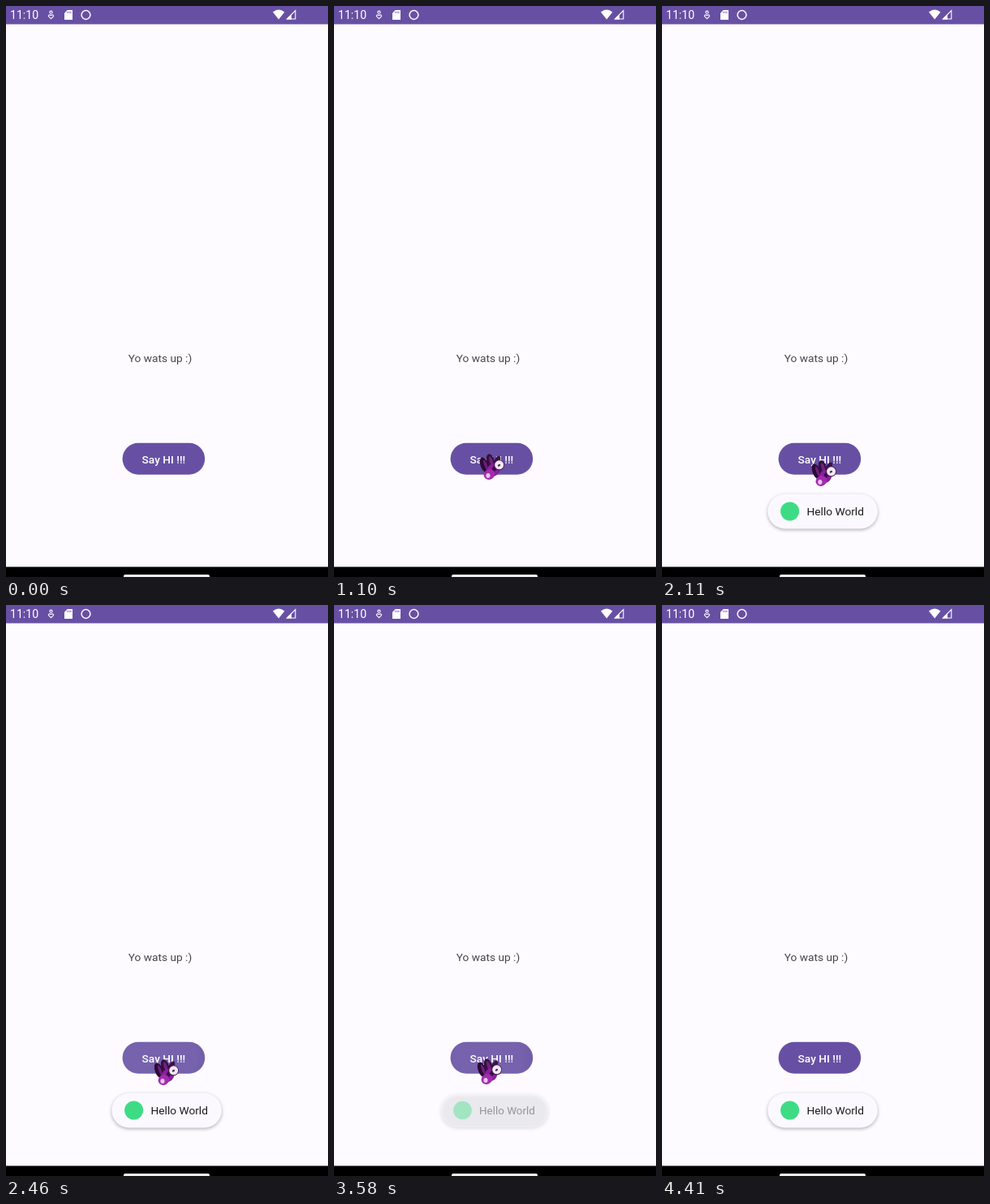
An HTML page with a canvas that plays this animation: 397x704 px, repeating every 5.74 s.

```html
<!DOCTYPE html>
<html lang="en">
<head>
<meta charset="utf-8">
<title>Say HI</title>
<style>
  html, body { margin: 0; width: 100%; height: 100%; overflow: hidden; background: #fdfbff; }
  canvas { display: block; width: 397px; height: 704px; }
</style>
</head>
<body>
<canvas id="stage"></canvas>
<script>
const W = 397, H = 704, LOOP = 5740;
const START = 320, END = 4410, STEP = (END - START) / 60;
const PURPLE = '#6750a4', PAPER = '#fdfbff';
const canvas = document.getElementById('stage');
const ctx = canvas.getContext('2d');
const dpr = window.devicePixelRatio || 1;
canvas.width = W * dpr;
canvas.height = H * dpr;

// Pointer stops: time, x, y of its top left corner
const path = [
  [320, 326, 684], [390, 284, 645], [460, 247, 607], [530, 216, 578],
  [600, 195, 561], [740, 179, 552], [1300, 179, 552], [1430, 184, 560],
  [1560, 185, 560], [2040, 185, 560], [2180, 182, 560], [3300, 182, 560],
  [3500, 176, 559], [4000, 176, 560], [4140, 188, 584], [4260, 211, 635],
  [4409, 236, 700]
];
// Taps: pointer down, pointer up, ripple start
const taps = [[1220, 1300, 1480], [2240, 2375, 2300], [2915, 3080, 2950], [3360, 3500, 3420]];

const clamp = v => Math.min(1, Math.max(0, v));
const ramp = (t, a, b) => clamp((t - a) / (b - a));
const easeOut = p => 1 - (1 - p) ** 3;
const mix = (a, b, p) => a + (b - a) * p;

function pointerAt(t) {
  const i = path.findIndex(p => p[0] > t);
  if (i < 1) return null;
  const [a, b] = [path[i - 1], path[i]];
  const p = ramp(t, a[0], b[0]);
  return { x: mix(a[1], b[1], p), y: mix(a[2], b[2], p) };
}

function pill(x, y, w, h, r = h / 2) {
  ctx.beginPath();
  ctx.roundRect(x, y, w, h, r);
}

function poly(...pts) {
  ctx.beginPath();
  for (let i = 0; i < pts.length; i += 2) ctx.lineTo(pts[i], pts[i + 1]);
  ctx.closePath();
}

function oval(x, y, rx, ry, turn, fill) {
  ctx.beginPath();
  ctx.ellipse(x, y, rx, ry, turn, 0, Math.PI * 2);
  ctx.fillStyle = fill;
  ctx.fill();
}

const dot = (x, y, r, fill) => oval(x, y, r, r, 0, fill);

function label(text, x, y, color, size = 13.7, weight = 400, align = 'left') {
  ctx.font = `${weight} ${size}px Roboto, sans-serif`;
  ctx.textAlign = align;
  ctx.fillStyle = color;
  ctx.fillText(text, x, y);
}

function drawStatusBar() {
  ctx.fillStyle = PURPLE;
  ctx.fillRect(0, 0, W, 22.5);
  label('11:10', 5, 16.3, '#fff', 14.1);

  ctx.strokeStyle = ctx.fillStyle = '#fff';
  ctx.lineWidth = 1.1;
  ctx.beginPath();
  ctx.arc(55.5, 7.7, 1.6, 0, Math.PI * 2);
  ctx.stroke();
  ctx.beginPath();
  ctx.moveTo(55.5, 15.7);
  ctx.lineTo(52.4, 12.6);
  ctx.quadraticCurveTo(52.6, 9.8, 55.5, 11.6);
  ctx.quadraticCurveTo(58.4, 9.8, 58.6, 12.6);
  ctx.closePath();
  ctx.stroke();

  poly(75.7, 5, 82, 5, 82, 17, 72, 17, 72, 8.7);
  ctx.fill();
  ctx.fillStyle = PURPLE;
  for (const x of [75.3, 77.4, 79.5]) ctx.fillRect(x, 6.7, 0.9, 2.2);

  ctx.lineWidth = 1.5;
  ctx.beginPath();
  ctx.arc(98.5, 11, 5.4, 0, Math.PI * 2);
  ctx.stroke();

  ctx.fillStyle = '#fff';
  ctx.beginPath();
  ctx.moveTo(336.2, 16.5);
  ctx.lineTo(329, 7.4);
  ctx.quadraticCurveTo(336.2, 1.4, 343.4, 7.4);
  ctx.fill();

  ctx.lineWidth = 1.1;
  poly(346.4, 16, 356.8, 16, 356.8, 5.6);
  ctx.stroke();
  poly(345.6, 16.5, 352, 16.5, 352, 10.2);
  ctx.fill();
}

function drawNavBar() {
  ctx.fillStyle = '#000';
  ctx.fillRect(0, 691.5, W, 13);
  ctx.fillStyle = '#f2f2f2';
  pill(145, 701, 106, 6, 2);
  ctx.fill();
}

function drawButton(t) {
  ctx.save();
  pill(143.6, 538.8, 101.6, 39, 19.5);
  ctx.fillStyle = PURPLE;
  ctx.fill();
  ctx.clip();
  for (const [, , at] of taps) {
    const alpha = 0.1 * ramp(t, at, at + 60) * (1 - ramp(t, at + 180, at + 380));
    if (alpha <= 0) continue;
    const r = mix(20, 92, easeOut(ramp(t, at, at + 220)));
    const glow = ctx.createRadialGradient(190, 560, r * 0.5, 190, 560, r);
    glow.addColorStop(0, `rgba(255,255,255,${alpha})`);
    glow.addColorStop(1, 'rgba(255,255,255,0)');
    dot(190, 560, r, glow);
  }
  ctx.restore();
  label('Say HI !!!', 194.4, 563.8, '#fff', 13.7, 500, 'center');
}

function drawToast(t) {
  const show = t < 3650
    ? ramp(t, 1440, 1620) * (1 - ramp(t, 3420, 3595))
    : ramp(t, 3690, 3860);
  if (!show) return;
  const scale = mix(0.9, 1, easeOut(show));
  ctx.save();
  ctx.globalAlpha = show;
  ctx.translate(198, 623);
  ctx.scale(scale, scale);
  ctx.translate(-198, -623);
  ctx.shadowColor = 'rgba(0,0,0,0.3)';
  ctx.shadowBlur = 4 * dpr;
  ctx.shadowOffsetY = 1.5 * dpr;
  ctx.fillStyle = '#fbf9ff';
  pill(130.3, 601.8, 135.6, 42.6);
  ctx.fill();
  ctx.shadowColor = 'transparent';
  dot(157.6, 623, 11.5, '#3ddc84');
  label('Hello World', 178.6, 628.4, '#1b1b1f');
  ctx.restore();
}

function drawPointer(t) {
  const pos = pointerAt(t);
  if (!pos) return;
  ctx.save();
  ctx.translate(pos.x, pos.y);
  oval(6.5, 14, 4.8, 10, -0.35, '#2c0a35');
  oval(14.5, 10.5, 5, 10.5, -0.3, '#35103f');
  oval(22, 9, 3.4, 7, 0.45, '#3b1247');
  oval(8, 14, 1.8, 7, -0.35, '#6b1f7c');
  oval(15, 10, 2, 7, -0.3, '#702382');
  oval(17.5, 20, 7.5, 8, 0.5, '#8a1f9b');
  oval(18.5, 18.5, 2.5, 3.5, 0.5, '#3a0b48');
  oval(12.5, 25.5, 7, 6.3, -0.5, '#a32bb0');
  oval(11, 27, 2.6, 3, 0, '#e8c4ea');
  dot(24.5, 14, 6.5, '#4a1657');
  dot(24.7, 13.8, 5.5, '#f3e9f5');
  oval(24.5, 14.2, 1.8, 1.3, -0.6, '#4a2a55');
  if (taps.some(([down, up]) => t >= down && t < up)) {
    dot(5.5, 3.2, 12, 'rgba(214,205,40,0.72)');
  }
  ctx.restore();
}

function draw(t) {
  if (t >= START && t < END) t = START + Math.floor((t - START) / STEP + 0.01) * STEP;
  ctx.setTransform(dpr, 0, 0, dpr, 0, 0);
  ctx.fillStyle = PAPER;
  ctx.fillRect(0, 0, W, H);
  drawStatusBar();
  label('Yo wats up :)', 190, 439, '#49454f', 13.7, 400, 'center');
  drawButton(t);
  drawToast(t);
  drawNavBar();
  drawPointer(t);
}

let origin;
function tick(now) {
  origin ??= now;
  draw((now - origin) % LOOP);
  requestAnimationFrame(tick);
}
requestAnimationFrame(tick);
</script>
</body>
</html>
```
